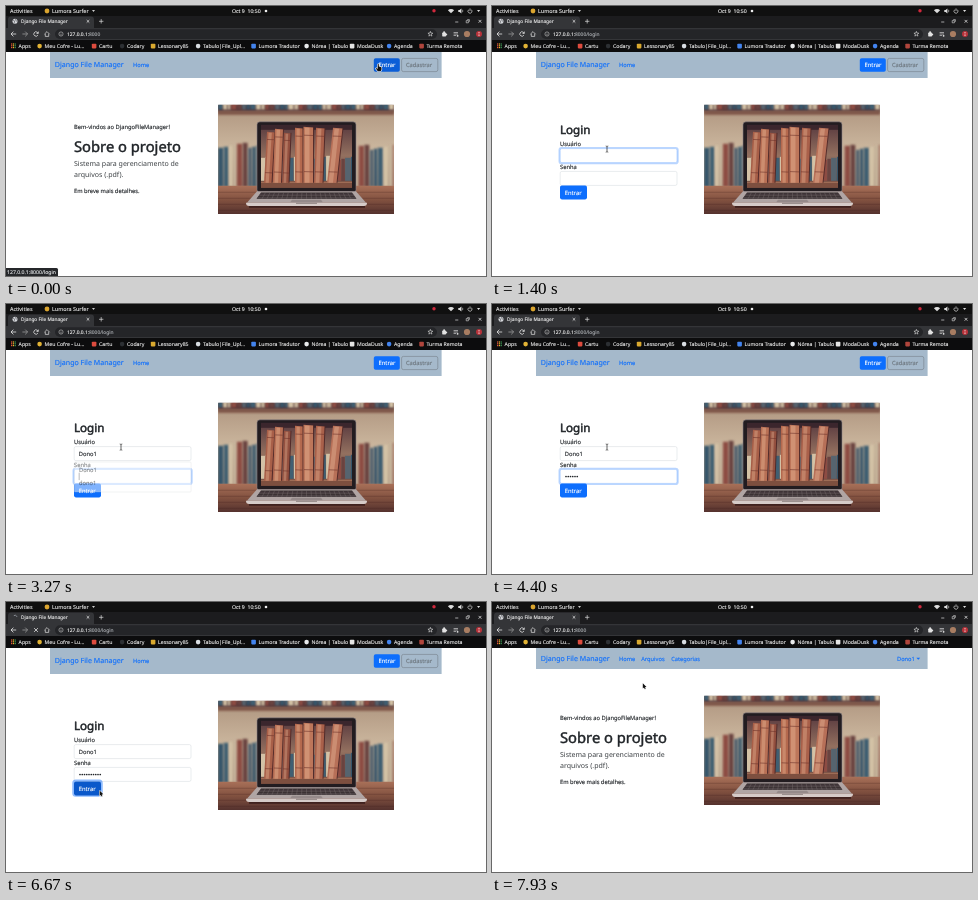
An HTML page with a canvas that plays this animation: 480 px wide and 270 px high, repeating every 8000 ms.

```html
<!DOCTYPE html>
<html lang="pt">
<head>
<meta charset="utf-8">
<title>Django File Manager</title>
<style>
html, body { margin: 0; width: 100%; height: 100%; overflow: hidden; background: #fff; }
canvas { display: block; width: 480px; height: 270px; }
</style>
</head>
<body>
<canvas id="stage" width="480" height="270"></canvas>
<script>
const LOOP = 8000;
const LOGIN_AT = 470, FOCUS_AT = 1070, TAB_AT = 3200, SUBMIT_AT = 6470, HOME_AT = 7200;
const KEYS = [1600, 1800, 2070, 2470, 3000];
const DOTS = [3530, 3670, 3870, 4130, 4270, 4400, 4600, 4670, 4870, 5070];
const USER = 'Dono1';
const BLUE = '#0d6efd', DARK_BLUE = '#0b5ed7', INK = '#212529';

const canvas = document.getElementById('stage');
const c = canvas.getContext('2d');
if ('textRendering' in c) c.textRendering = 'geometricPrecision';

// Helpers; a thin outline gives text its weight
function text(s, x, y, size, color, bold = 0.13) {
  c.font = `${size}px "Noto Sans", "Open Sans", sans-serif`;
  c.fillStyle = c.strokeStyle = color;
  c.lineWidth = bold;
  c.lineJoin = 'round';
  c.fillText(s, x, y);
  if (bold) c.strokeText(s, x, y);
}
function rect(x, y, w, h, color) {
  c.fillStyle = color;
  c.fillRect(x, y, w, h);
}
function box(x, y, w, h, r, fill, stroke, lw = 0.5) {
  c.beginPath();
  c.roundRect(x, y, w, h, r);
  if (fill) { c.fillStyle = fill; c.fill(); }
  if (stroke) { c.strokeStyle = stroke; c.lineWidth = lw; c.stroke(); }
}
function disc(x, y, r, color) {
  c.beginPath();
  c.arc(x, y, r, 0, 7);
  c.fillStyle = color;
  c.fill();
}
function line(color, lw, ...p) {
  c.beginPath();
  for (let i = 0; i < p.length; i += 2) c.lineTo(p[i], p[i + 1]);
  c.strokeStyle = color;
  c.lineWidth = lw;
  c.stroke();
}
function poly(color, ...p) {
  c.beginPath();
  for (let i = 0; i < p.length; i += 2) c.lineTo(p[i], p[i + 1]);
  c.closePath();
  c.fillStyle = color;
  c.fill();
}
function arc(x, y, r, a, b, color, lw) {
  c.beginPath();
  c.arc(x, y, r, a, b);
  c.strokeStyle = color;
  c.lineWidth = lw;
  c.stroke();
}
function cross(x, y, r, color) {
  line(color, 0.8, x - r, y - r, x + r, y + r);
  line(color, 0.8, x + r, y - r, x - r, y + r);
}
function fade(y0, y1, ...colors) {
  const g = c.createLinearGradient(0, y0, 0, y1);
  colors.forEach((color, i) => g.addColorStop(i / (colors.length - 1), color));
  return g;
}
const clamp = v => Math.max(0, Math.min(1, v));
const ease = v => v * v * (3 - 2 * v);
const span = (t, a, b) => ease(clamp((t - a) / (b - a)));
const mix = (a, b, k) => a + (b - a) * k;
const count = (list, t) => list.filter(k => t >= k).length;

// Browser
function topBar() {
  rect(0, 0, 480, 10, '#101010');
  text('Activities', 4, 7, 5.4, '#e4e4e4');
  disc(41, 5, 2.4, '#dba52f');
  text('Lumora Surfer', 46, 7, 5.4, '#e4e4e4');
  poly('#ccc', 86, 4, 89, 4, 87.5, 6);
  text('Oct 9  10:50', 226, 7, 5.2, '#eee');
  disc(260, 5, 1.3, '#eee');
  disc(428, 4.8, 1.7, '#d0283c');
  c.beginPath();
  c.moveTo(445, 7.3);
  c.arc(445, 7.3, 4.4, -2.35, -0.79);
  c.fillStyle = '#ddd';
  c.fill();
  poly('#ddd', 452.3, 4, 453.6, 4, 455.4, 2.4, 455.4, 7.6, 453.6, 6, 452.3, 6);
  arc(455, 5, 1.8, -0.8, 0.8, '#ddd', 0.6);
  arc(464, 5.2, 2, -0.9, 4.04, '#ddd', 0.7);
  line('#ddd', 0.7, 464, 2.4, 464, 5);
  poly('#ddd', 471, 4, 474.2, 4, 472.6, 6);
}
function tabs(t, loading) {
  rect(0, 10, 480, 12, '#1c1c1e');
  box(2, 10.5, 86, 13, [3, 3, 0, 0], '#343538');
  if (loading) {
    const a = t / 110;
    arc(9, 15.3, 2, a, a + 2, '#aeb4bc', 0.7);
  } else {
    disc(9, 15.3, 2.5, '#d4d6da');
    line('#343538', 0.5, 7, 14.2, 8.7, 15, 8.2, 17);
    line('#343538', 0.5, 9.5, 13, 9.8, 14.6, 11.3, 15.5);
  }
  text('Django File Manager', 15, 17.2, 4.8, '#ececec');
  cross(82, 15.3, 1.3, '#ddd');
  line('#ddd', 0.7, 93, 15.3, 97.4, 15.3);
  line('#ddd', 0.7, 95.2, 13.1, 95.2, 17.5);
  line('#ddd', 0.7, 449.2, 16, 452.3, 16);
  c.strokeStyle = '#ddd';
  c.lineWidth = 0.6;
  c.strokeRect(460.2, 14.6, 2.2, 2.2);
  line('#ddd', 0.6, 461.2, 13.6, 463.4, 13.6, 463.4, 15.8);
  cross(474, 15.3, 1.4, '#ddd');
}
function toolbar(loading, path) {
  const g = '#e2e2e2';
  rect(0, 22, 480, 12, '#343538');
  box(49, 23.2, 382, 9.8, 4.9, '#242528');
  line(g, 0.8, 10.2, 28, 5, 28);
  line(g, 0.8, 7.4, 25.6, 5, 28, 7.4, 30.4);
  line('#9a9a9a', 0.8, 16.4, 28, 21.6, 28);
  line('#9a9a9a', 0.8, 19.2, 25.6, 21.6, 28, 19.2, 30.4);
  if (loading) cross(30, 28, 1.9, g);
  else {
    arc(30, 28, 2.2, 0.5, 5.5, g, 0.8);
    poly(g, 32.6, 25.2, 32.6, 27.8, 30.1, 27.8);
  }
  line(g, 0.7, 38.4, 28.2, 41, 25.6, 43.6, 28.2);
  line(g, 0.7, 39.3, 27.8, 39.3, 30.4, 42.7, 30.4, 42.7, 27.8);
  arc(55, 28, 2.1, 0, 7, '#c4c4c4', 0.6);
  line('#c4c4c4', 0.6, 55, 27.6, 55, 29.3);
  text('127.0.0.1:', 61, 29.9, 4.9, '#f1f1f1');
  const w = c.measureText('127.0.0.1:').width;
  text('8000' + path, 61 + w, 29.9, 4.9, '#a9acb0');
  const star = [];
  for (let i = 0; i < 11; i++) {
    const r = i % 2 ? 1.1 : 2.6, a = i * Math.PI / 5 - Math.PI / 2;
    star.push(424.4 + r * Math.cos(a), 28 + r * Math.sin(a));
  }
  line(g, 0.6, ...star);
  box(436.2, 26.6, 3.8, 3.8, 0.6, g);
  disc(438.1, 26.3, 1, g);
  disc(440.2, 28.5, 1, g);
  for (let i = 0; i < 3; i++) line(g, 0.6, 447.6, 26.5 + i * 1.5, i < 2 ? 452 : 450, 26.5 + i * 1.5);
  disc(451.6, 29.8, 0.9, g);
  disc(461, 28, 3.1, '#a87d62');
  disc(473, 28, 3, '#b8323a');
  for (let i = -1; i < 2; i++) disc(473, 28 + i * 1.5, 0.5, '#fff');
}
function bookmarks() {
  rect(0, 34, 480, 12, '#0c0c0d');
  const hues = ['#e5533d', '#f0b429', '#43a35c'];
  for (let i = 0; i < 9; i++) rect(5 + i % 3 * 1.8, 37.4 + (i / 3 | 0) * 1.8, 1.2, 1.2, hues[i % 3]);
  text('Apps', 12.6, 41.7, 5.2, '#e8e8e8');
  const items = [
    ['Meu Cofre - Lu…', 38.5, '#e2b335'], ['Cartu', 93, '#dd4b3e'], ['Codary', 121, '#2c2f33'],
    ['Lessonary85', 152, '#d9a92f'], ['Tabulo|File_Upl…', 197, '#d8dde2'],
    ['Lumora Tradutor', 252.5, '#4384ef'], ['Nórea | Tabulo', 305.5, '#e8eaec'],
    ['ModaDusk', 351, '#e4e4e4'], ['Agenda', 388, '#4384ef'], ['Turma Remota', 420.5, '#b0453c']
  ];
  items.forEach(([name, x, color], i) => {
    if (i % 2) box(x - 7.2, 37.8, 4.6, 4.6, 0.8, color);
    else disc(x - 4.9, 40.1, 2.3, color);
    text(name, x, 41.7, 5.2, '#e8e8e8');
  });
}
function status(label, w) {
  box(-2, 262, w + 2, 10, [0, 1.5, 0, 0], '#25272a');
  text(label, 1, 268, 5.15, '#e2e4e6');
}

// Page
function button(label, x, y, w, h, fill) {
  box(x, y, w, h, 1.8, fill);
  text(label, x + 4.7, y + h / 2 + 2.1, 5.8, '#fff');
}
function navbar(signedIn, hover) {
  const h = signedIn ? 21 : 26, y = signedIn ? 59.2 : 61.4;
  rect(44, 46, 391.6, h, '#a5b9cb');
  text('Django File Manager', 48.8, y, 7.08, BLUE);
  text('Home', 127, y - 0.2, 5.7, BLUE);
  if (signedIn) {
    text('Arquivos', 149.2, y - 0.2, 5.7, BLUE);
    text('Categorias', 179.2, y - 0.2, 5.7, BLUE);
    text(USER, 405, y - 0.2, 5.7, BLUE);
    poly(BLUE, 424.4, 55.7, 428.2, 55.7, 426.3, 57.7);
  } else {
    button('Entrar', 367.8, 52.2, 26, 13.6, hover ? DARK_BLUE : BLUE);
    box(395.6, 52.4, 36.2, 13.2, 1.8, null, '#6c757d', 0.5);
    text('Cadastrar', 400, 61.1, 5.7, '#6c757d');
  }
}
function intro(dy) {
  text('Bem-vindos ao DjangoFileManager!', 68, 123.3 + dy, 5.74, INK);
  text('Sobre o projeto', 68, 145.6 + dy, 14.75, INK, 0.45);
  text('Sistema para gerenciamento de', 68, 160.4 + dy, 7.02, '#3c4044', 0);
  text('arquivos (.pdf).', 68, 171 + dy, 7.02, '#3c4044', 0);
  text('Em breve mais detalhes.', 68, 187 + dy, 5.74, INK);
}
function field(y, focus) {
  if (focus) box(67.4, y - 0.6, 118.4, 15.6, 2.2, null, 'rgba(13,110,253,.28)', 1.8);
  box(68.2, y + 0.2, 116.8, 14, 1.6, '#fff', focus ? '#86b7fe' : '#d3d8dd', 0.5);
}
function suggestions(rows, alpha) {
  c.globalAlpha = alpha;
  box(68.3, 158, 116.8, rows.length * 13 + 4, 1, '#fff', '#c9ccd0', 0.5);
  rows.forEach((s, i) => text(s, 73, 168.4 + i * 12.8, 5.7, INK));
  c.globalAlpha = 1;
}
function login(t) {
  const typed = count(KEYS, t), dots = count(DOTS, t);
  const sent = t >= SUBMIT_AT;
  text('Login', 68, 128.1, 11.6, INK, 0.5);
  text('Usuário', 68, 140.4, 5.74, INK);
  field(142.4, t >= FOCUS_AT && t < TAB_AT);
  text(USER.slice(0, typed), 72.8, 151.7, 5.74, INK);
  text('Senha', 68, 163.4, 5.74, INK);
  field(165.2, t >= TAB_AT && !sent);
  for (let i = 0; i < dots; i++) disc(74 + i * 2.25, 172.5, 0.85, INK);
  if (sent) box(67.2, 178.5, 28.6, 15.4, 2.6, null, 'rgba(49,132,253,.55)', 1.9);
  button('Entrar', 68, 179.4, 27, 14, sent ? '#0a58ca' : t > 6200 ? DARK_BLUE : BLUE);
  if (t >= TAB_AT && t < 3730) rect(72.8, 168.7, 0.6, 7.4, INK);
  if (typed && t < 3400) {
    const rows = typed < 4 ? [USER, 'dono1', 'Dona'] : [USER, 'dono1'];
    suggestions(rows, 1 - clamp((t - TAB_AT) / 135));
  }
}

// Soft row of books for the background
function blurredBooks(x, end, top, base, seed) {
  const hues = ['#56646f', '#8d4c43', '#d3c2a6', '#36566b', '#6a4340', '#c4b299', '#3f5f72'];
  for (let i = seed; x < end; i++) {
    const w = 3.4 + i * 7 % 4 * 0.7, y = top + i * 5 % 6;
    rect(x, y, Math.min(w, end - x), base - y, hues[i * 3 % 7]);
    x += w + 0.3;
  }
}
function book(x, w, top, lean, color) {
  const base = 78;
  poly(color, x + lean, top, x + w + lean, top + 0.6, x + w, base, x, base);
  poly('rgba(255,214,180,.28)', x + lean + 1.5, top + 1, x + lean + w * 0.6, top + 1, x + w * 0.6, base, x + 1.5, base);
  line('#4c2626', 0.9, x + w + lean, top, x + w, base);
  for (const k of [0.15, 0.8]) {
    const y = mix(top, base, k), dx = lean * (1 - k);
    line('#6f352c', 0.6, x + dx + 0.5, y, x + w + dx - 0.5, y + 0.3);
  }
}
function photo(y) {
  c.save();
  c.translate(212, y);
  c.beginPath();
  c.rect(0, 0, 176, 109.3);
  c.clip();
  rect(0, 0, 176, 86, fade(8, 86, '#b39a84', '#cdb9a0', '#a98f7c'));
  c.filter = 'blur(0.9px)';
  rect(0, 0, 176, 7, '#4a3036');
  blurredBooks(0, 176, -7, 5, 2);
  rect(0, 6, 176, 4, '#7e5548');
  blurredBooks(0, 40, 38, 82, 1);
  blurredBooks(137, 176, 40, 82, 4);
  c.filter = 'none';
  rect(0, 81, 176, 29, fade(81, 110, '#a87058', '#80503f', '#52302d'));
  for (let i = 0; i < 4; i++) rect(0, 87 + i * 6, 176, 0.8, 'rgba(50,20,22,.3)');

  box(39, 17, 99, 71, 3, '#221c20', '#8d8587', 0.6);
  rect(43, 21, 91, 62, fade(21, 80, '#5b3c40', '#93705f', '#6b4840'));
  blurredBooks(43, 134, 50, 76, 3);
  rect(43, 20, 91, 5, '#3b262d');
  rect(43, 77, 91, 6, '#7d4f3f');
  rect(43, 77, 91, 0.9, '#ad7a5f');
  book(46, 8, 27, 3, '#a85f48');
  book(55, 8.5, 24, 2, '#b87055');
  book(64, 7, 28, 2, '#94503f');
  book(77, 8, 23, 0, '#b4694e');
  book(85.5, 10, 22, 0, '#bd765a');
  book(96, 9, 23, 2, '#a9604a');
  book(109, 10, 23, 6, '#b77058');

  poly('#b0a5a4', 39, 86.5, 138, 86.5, 148, 98, 29, 98);
  poly('#2d2427', 43, 87.6, 134, 87.6, 138.5, 94, 38.5, 94);
  for (let i = 0; i < 3; i++) line('#7d7173', 0.5, 42 - i, 89.3 + i * 1.6, 135.5 + i, 89.3 + i * 1.6);
  for (let i = 1; i < 20; i++) line('#7d7173', 0.4, 43 + i * 4.55, 87.6, 39 + i * 4.95, 94);
  poly('#958a8a', 74, 95, 103, 95, 105, 97.8, 72, 97.8);
  box(28, 98, 121, 3.2, [0, 0, 3, 3], '#d6cbc8');
  rect(78, 98, 21, 1, '#8d8281');
  rect(31, 101.2, 116, 1.8, 'rgba(35,12,14,.6)');
  c.restore();
}

// Pointer
function pointer(t) {
  if (t < LOGIN_AT) return [372, 58, 'hand'];
  if (t < 5670) {
    const k = span(t, LOGIN_AT, FOCUS_AT);
    return [mix(372, 115, k), mix(58, 143, k), k > 0.98 ? 'beam' : 'arrow'];
  }
  if (t < SUBMIT_AT + 60) {
    const a = span(t, 5670, 6070), b = span(t, 6070, 6330);
    const x = mix(mix(115, 106, a), 93.6, b), y = mix(mix(143, 203, a), 188.6, b);
    return [x, y, t <= 5700 ? 'beam' : b > 0.85 ? 'hand' : 'arrow'];
  }
  const k = span(t, 6750, 7300), m = span(t, 7340, 7900);
  return [mix(mix(93.6, 152.2, k), 150.8, m), mix(mix(188.6, 177, k), 81.3, m), 'arrow'];
}
function drawPointer(x, y, kind) {
  c.save();
  c.translate(x, y);
  c.lineJoin = 'round';
  if (kind === 'beam') {
    line('#222', 0.7, 0, -2.6, 0, 2.8);
    line('#222', 0.6, -1.3, -3, 0, -2.6, 1.3, -3);
    line('#222', 0.6, -1.3, 3.2, 0, 2.8, 1.3, 3.2);
  } else {
    const p = kind === 'hand'
      ? [-0.3, 0, 0.7, 0, 0.9, 2.6, 3.4, 3.2, 3.6, 5.2, 2.7, 7.2, -0.2, 7.2, -2.2, 4.6, -1.6, 4, -0.4, 4.9]
      : [0, 0, 0, 5.3, 1.2, 4.3, 2, 6, 2.9, 5.6, 2.1, 3.9, 3.7, 3.7];
    line('#fff', 1.2, ...p, p[0], p[1]);
    poly('#111', ...p);
  }
  c.restore();
}

function draw(t) {
  const signedIn = t >= HOME_AT, onLogin = t >= LOGIN_AT && !signedIn;
  const loading = (t >= 70 && t < LOGIN_AT) || (t >= SUBMIT_AT && t < HOME_AT);
  const dy = signedIn ? -5 : 0;
  rect(0, 0, 480, 270, '#fff');
  topBar();
  tabs(t, loading);
  toolbar(loading, onLogin ? '/login' : '');
  bookmarks();
  navbar(signedIn, t < 530);
  if (onLogin) login(t); else intro(dy);
  photo(98.8 + dy);
  if (t < 530) status('127.0.0.1:8000/login', 52);
  if (t >= 6900 && t < 7500) status('Waiting for 127.0.0.1…', 159);
  drawPointer(...pointer(t));
}

const start = performance.now();
function tick() {
  draw((performance.now() - start) % LOOP);
  requestAnimationFrame(tick);
}
tick();
</script>
</body>
</html>
```
